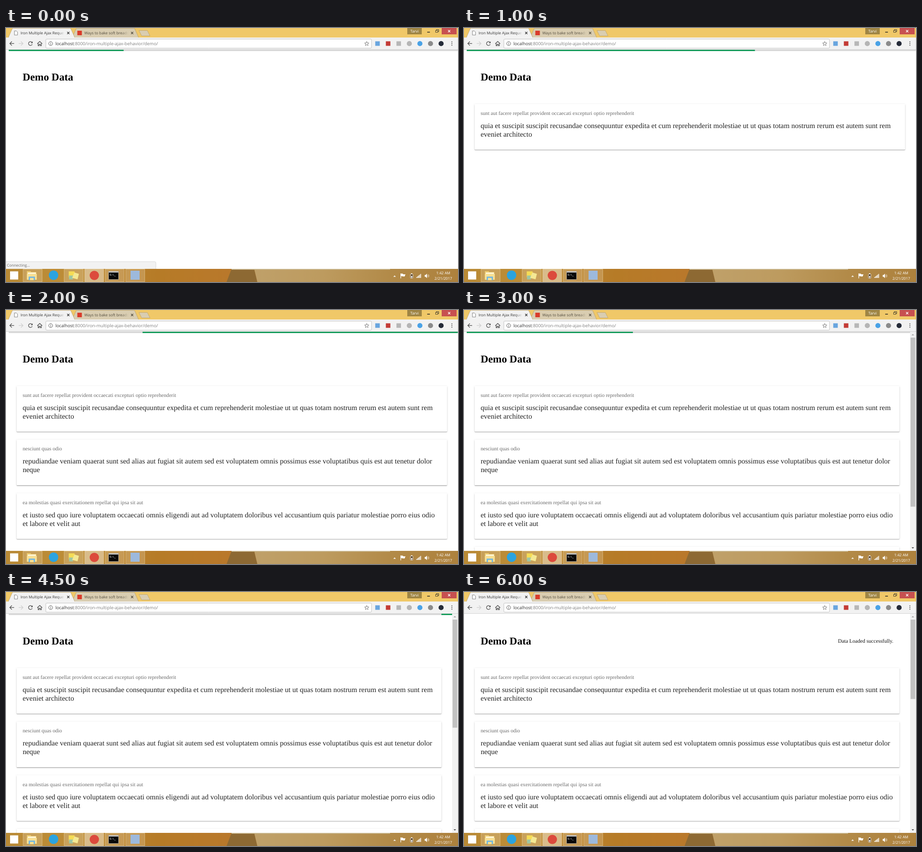
An HTML page with a canvas for the animation above (7500 ms loop, 998 by 561 pixels).

```html
<!DOCTYPE html>
<html lang="en">
<head>
<meta charset="utf-8">
<title>Demo Data</title>
<style>
html, body { margin: 0; width: 100%; height: 100%; overflow: hidden; background: #fff; }
canvas { display: block; width: 100vw; height: 100vh; }
</style>
</head>
<body>
<canvas id="stage" width="998" height="561"></canvas>
<script>
const ctx = document.getElementById('stage').getContext('2d');
ctx.textRendering = 'geometricPrecision';

const W = 998, H = 561, TOP = 48, BOTTOM = 532;
const LOOP = 7500, STEP = 500, DONE = 6000;
const UI = '"Open Sans", "Noto Sans", sans-serif';
const SERIF = '"Liberation Serif", "Times New Roman", serif';
const INK = '#4d4d4d';

// Times in seconds at which a request delivers its card
const ARRIVALS = [1, 1.5, 2, 3, 3.5, 3.5, 4.5, 5, 5.5, 6];

// Progress sweeps: when the head sets off and lands, then the tail
const FIRST = { head: [-663, 1928], tail: [1000, 4355] };
const NEXT = { head: [2575, 3709], tail: [3167, 4533] };
const PERIOD = 2025;

const CARDS = [
  ['sunt aut facere repellat provident occaecati excepturi optio reprehenderit',
   'quia et suscipit suscipit recusandae consequuntur expedita et cum reprehenderit molestiae ut ut quas totam nostrum rerum est autem sunt rem',
   'eveniet architecto'],
  ['nesciunt quas odio',
   'repudiandae veniam quaerat sunt sed alias aut fugiat sit autem sed est voluptatem omnis possimus esse voluptatibus quis est aut tenetur dolor',
   'neque'],
  ['ea molestias quasi exercitationem repellat qui ipsa sit aut',
   'et iusto sed quo iure voluptatem occaecati omnis eligendi aut ad voluptatem doloribus vel accusantium quis pariatur molestiae porro eius odio',
   'et labore et velit aut'],
  ['']
];

const clamp = v => Math.max(0, Math.min(1, v));
const ramp = (t, [from, to]) => clamp((t - from) / (to - from));

function rect(x, y, w, h, fill) {
  ctx.fillStyle = fill;
  ctx.fillRect(x, y, w, h);
}

function outline(color, width) {
  ctx.strokeStyle = color;
  ctx.lineWidth = width;
  ctx.stroke();
}

function path(points) {
  ctx.beginPath();
  for (let i = 0; i < points.length; i += 2) ctx.lineTo(points[i], points[i + 1]);
}

function poly(points, fill, stroke) {
  path(points);
  ctx.closePath();
  ctx.fillStyle = fill;
  ctx.fill();
  if (stroke) outline(stroke, .8);
}

function line(points, color, width = 1.3) {
  path(points);
  outline(color, width);
}

function box(x, y, w, h, r, fill, stroke) {
  ctx.beginPath();
  ctx.roundRect(x, y, w, h, r);
  ctx.fillStyle = fill;
  ctx.fill();
  if (stroke) outline(stroke, .8);
}

function disc(x, y, r, fill) {
  ctx.beginPath();
  ctx.arc(x, y, r, 0, 7);
  ctx.fillStyle = fill;
  ctx.fill();
}

function square(x, y, r, fill) {
  rect(x - r, y - r, 2 * r, 2 * r, fill);
}

function arc(x, y, r, from, to, color, width = 1) {
  ctx.beginPath();
  ctx.arc(x, y, r, from, to);
  outline(color, width);
}

function triangle(x, y, dir, fill) {
  poly([x - 2.8, y + 1.5 * dir, x + 2.8, y + 1.5 * dir, x, y - 1.5 * dir], fill);
}

function cross(x, y, color) {
  line([x - 2.5, y - 2.5, x + 2.5, y + 2.5], color);
  line([x - 2.5, y + 2.5, x + 2.5, y - 2.5], color);
}

function text(str, x, y, font, fill, align = 'left') {
  ctx.font = font;
  ctx.fillStyle = fill;
  ctx.textAlign = align;
  ctx.fillText(str, x, y);
}

function gradient(x0, x1, ...colors) {
  const g = ctx.createLinearGradient(x0, 0, x1, 0);
  colors.forEach((c, i) => g.addColorStop(i / (colors.length - 1), c));
  return g;
}

function drawTab(x, title, titleX, fill, color) {
  const end = x + 147;
  poly([x, 21.5, x + 8.5, 2, x + 10.5, .6, end - 10.5, .6, end - 8.5, 2, end, 21.5], fill, '#b9a06a');
  ctx.save();
  ctx.beginPath();
  ctx.rect(titleX, 2, end - 23 - titleX, 17);
  ctx.clip();
  text(title, titleX, 14, '8.4px ' + UI, gradient(end - 38, end - 23, color, color + '00'));
  ctx.restore();
  cross(end - 14.5, 11, color);
}

function drawTitleBar() {
  rect(0, 0, W, 21, '#f0c868');
  drawTab(146, 'Ways to bake soft breads', 173, '#d9cdb1', '#504a3c');
  drawTab(5, 'Iron Multiple Ajax Request', 32, '#f2f2f2', '#333333');
  poly([293.5, 5.5, 312, 5.5, 318, 17.5, 299.5, 17.5], '#d9cdb1', '#b9a06a');
  poly([18.5, 6.5, 23, 6.5, 25.5, 9, 25.5, 15.5, 18.5, 15.5], '#fff', '#666');
  square(162.5, 11, 5, '#d93b2b');

  rect(886, 0, 32, 14, '#9f8544');
  text('Tarvi', 902, 10, '8.4px ' + UI, '#fff', 'center');
  rect(930, 8.5, 6, 1.5, '#222');
  box(950, 3.5, 5.5, 4.5, 0, '#f0c868', '#222');
  box(948.5, 5.5, 5, 4, 0, '#f0c868', '#222');
  rect(962, 0, 33, 14, '#c75050');
  cross(978.5, 7, '#fff');
}

function drawArrow(x, dir, color) {
  line([x - 5 * dir, 34.3, x + 5 * dir, 34.3], color);
  line([x, 29.7, x - 4.6 * dir, 34.3, x, 38.9], color);
}

function drawStar(x, y) {
  const points = [];
  for (let i = 0; i < 10; i++) {
    const a = i * Math.PI / 5 - Math.PI / 2, r = i % 2 ? 2.2 : 5;
    points.push(x + r * Math.cos(a), y + r * Math.sin(a));
  }
  poly(points, '#fff', '#555');
}

function drawToolbar() {
  rect(0, 21, W, 27, '#f2f2f2');
  rect(0, 47.3, W, .7, '#c6c6c6');
  drawArrow(13, 1, INK);
  drawArrow(33, -1, '#cfcfcf');
  arc(54, 34.3, 4.2, .4, 5.5, INK, 1.4);
  poly([58.8, 29.5, 58.8, 33.6, 54.7, 33.6], INK);
  line([69, 34.8, 74.5, 29.7, 80, 34.8], INK);
  line([71, 34, 71, 39, 73.2, 39, 73.2, 36, 75.8, 36, 75.8, 39, 78, 39, 78, 34], INK);

  box(88, 24.5, 719, 20, 2, '#fff', '#b4b4b4');
  arc(98.7, 34.4, 4.3, 0, 7, '#555');
  rect(98.2, 33.8, 1.1, 3, '#555');
  rect(98.2, 31.8, 1.1, 1.1, '#555');
  const font = '9.77px ' + UI;
  text('localhost', 109, 37.8, font, '#333');
  const host = ctx.measureText('localhost').width;
  text(':8000/iron-multiple-ajax-behavior/demo/', 109 + host, 37.8, font, '#808080');
  drawStar(796.5, 34.7);

  const badges = ['#69a5df', '#c33c36', '#b7b7b7', '#b5b5b5', '#4aa2e6', '#8b8b8b', '#252b38'];
  badges.forEach((color, i) =>
    (i < 3 ? square : disc)(820.3 + 23.4 * i, 34.4, i < 3 ? 5 : 5.6, color));
  for (let i = -1; i < 2; i++) disc(984.5, 34.4 + i * 3.7, 1.1, '#555');
}

function drawCard(y, right, [title, ...body]) {
  for (const [dy, blur, alpha] of [[1.5, 1.5, .14], [.7, 3.6, .12], [1.2, .7, .16]]) {
    ctx.shadowColor = `rgba(0,0,0,${alpha})`;
    ctx.shadowOffsetY = dy;
    ctx.shadowBlur = blur;
    box(23.6, y, right - 23.6, 100.6, 1.5, '#fff');
  }
  ctx.shadowColor = 'transparent';
  text(title, 36.7, y + 24, '11.69px ' + SERIF, '#6c6c6c');
  body.forEach((row, i) => text(row, 36.7, y + 53 + 19 * i, '16.05px ' + SERIF, '#212121'));
}

function drawProgress(t, right) {
  const shift = t < NEXT.head[0] + PERIOD ? 0 : PERIOD;
  const sweep = t < NEXT.head[0] ? FIRST : NEXT;
  const head = ramp(t - shift, sweep.head), tail = ramp(t - shift, sweep.tail);
  const span = right - 6;
  rect(6, TOP, span, 3, '#d9d9d9');
  rect(6 + span * tail, TOP, span * (head - tail), 3, '#189d5d');
}

function drawScrollbar(content) {
  const view = BOTTOM - TOP, track = view - 25;
  rect(985, TOP, 12.5, view, '#f1f1f1');
  rect(986, 61, 10.3, track * view / content, '#c1c1c1');
  triangle(991, 54.5, 1, '#a3a3a3');
  triangle(991, 525.5, -1, '#505050');
}

function drawPage(t) {
  const count = ARRIVALS.filter(s => s * 1000 <= t).length;
  const scrolls = count > 3;
  rect(0, TOP, W, BOTTOM - TOP, '#fff');
  text('Demo Data', 36.7, 115.6, 'bold 23.25px ' + SERIF, '#000');
  CARDS.slice(0, count).forEach((card, i) =>
    drawCard(168 + 118.4 * i, scrolls ? 961.3 : 973.8, card));
  if (t < DONE) drawProgress(t, scrolls ? 985 : 997.5);
  else text('Data Loaded successfully.', 948, 112, '11.69px ' + SERIF, '#111', 'right');
  if (scrolls) drawScrollbar(595 + 112 * (count - 4));
  if (!count) {
    box(-2, 516, 333, 20, 3, '#f2f2f2', '#d0d0d0');
    text('Connecting...', 2, 527.3, '8.4px ' + UI, '#6b6b6b');
  }
}

function drawTray() {
  triangle(858, 548, 1, '#fff');
  rect(871, 542, 1.2, 11, '#fff');
  poly([872, 542.5, 876, 542.5, 877, 544, 882, 544, 880, 549, 872, 548], '#fff');
  box(893, 543.5, 5.5, 9, 1, '#5b4325', '#fff');
  rect(894.5, 541.8, 2.5, 1.5, '#fff');
  rect(894.5, 547.5, 2.5, 4, '#fff');
  for (let i = 0; i < 5; i++) rect(906 + i * 2.2, 550 - i * 1.7, 1.5, 2 + i * 1.7, '#fff');
  poly([924.5, 545.5, 926.5, 545.5, 929.5, 542.5, 929.5, 552.5, 926.5, 549.5, 924.5, 549.5], '#fff');
  for (const r of [2.6, 4.8]) arc(929, 547.5, r, -.8, .8, '#fff', .8);
  ['1:42 AM', '2/21/2017'].forEach((str, i) =>
    text(str, 965.5, 543.9 + 12.4 * i, '8.2px ' + UI, '#fff', 'center'));
}

function drawTaskbar() {
  rect(0, BOTTOM, W, 29, gradient(0, 500, '#b98a35', '#bd8d38', '#b67b27', '#b9782b'));
  poly([498, BOTTOM, 548, BOTTOM, 555, H, 487, H], '#8d6933');
  poly([548, BOTTOM, W, BOTTOM, W, H, 555, H], gradient(550, W, '#bfa069', '#bd9b5f', '#b28a48', '#ad813d'));
  rect(498, BOTTOM, 350, 2, '#c9b78f');

  // The second program has no open window, the fourth one is active
  for (const i of [0, 2, 3, 4, 5]) {
    box(37.8 + 45.3 * i, 532.5, 42, 28, 0,
      `rgba(255,255,255,${i === 3 ? .42 : .18})`, 'rgba(255,240,205,.55)');
  }
  square(18, 546.5, 9, '#fff');

  // Folder
  rect(46, 537, 9, 5, '#eccb70');
  rect(46, 539, 21, 17, '#eccb70');
  rect(48, 540, 18, 5, '#fff6d8');
  rect(46, 543, 22, 13, '#f7df93');
  box(50, 549, 14, 8, 1, '#76b8de');
  rect(53, 552, 8, 5, '#f7df93');

  disc(105, 546, 10.5, '#2ba3df');

  // Notes
  square(145, 544, 6.5, '#f5dc55');
  square(143.5, 551, 4.3, '#9fc6a3');
  poly([151, 540, 161, 543, 158, 555, 146, 552], '#f4e893');

  disc(195, 546.5, 10.3, '#dc4a3c');

  box(226.5, 537.5, 22, 18, 0, '#080808', '#b9b9b9');
  rect(227, 538, 21, 2, '#d8d8d8');
  text('C:\\_', 229, 546.5, 'bold 5.5px "DejaVu Sans Mono", monospace', '#eee');

  square(285, 546, 10, '#9db9dc');
  drawTray();
}

const start = performance.now();
function tick() {
  const t = (performance.now() - start) % LOOP;
  drawPage(Math.min(DONE, Math.floor(t / STEP) * STEP));
  drawTitleBar();
  drawToolbar();
  drawTaskbar();
  requestAnimationFrame(tick);
}
tick();
</script>
</body>
</html>
```
